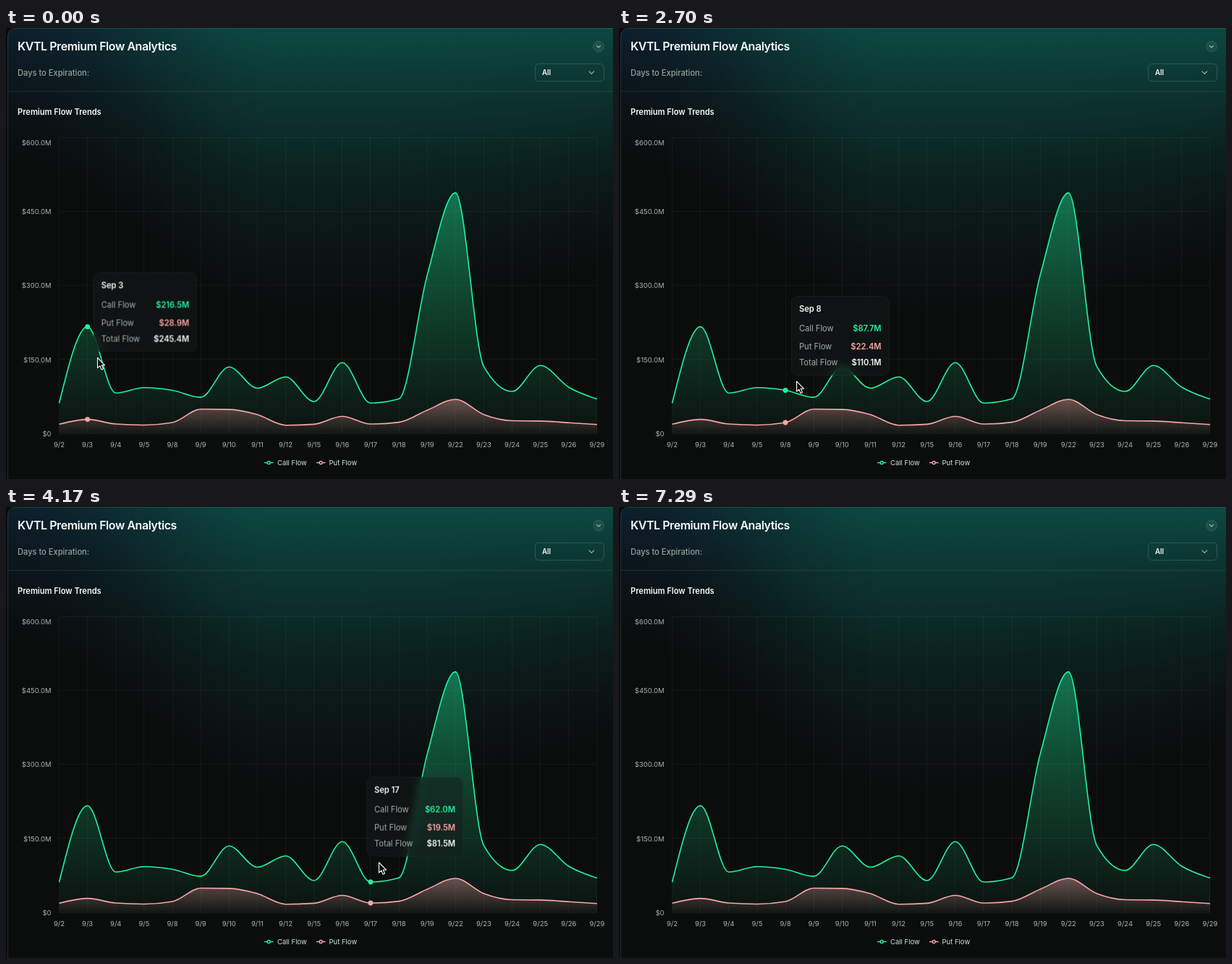
An HTML page with a canvas that plays this animation: 839x623 px, repeating every 7410 ms.

```html
<!DOCTYPE html>
<html lang="en">
<head>
<meta charset="utf-8">
<title>Premium Flow Analytics</title>
<style>
  html, body { margin: 0; width: 100%; height: 100%; overflow: hidden; background: #0a0c0c; }
  body { font-family: Inter, "Liberation Sans", sans-serif; }
  #stage { position: relative; width: 839px; height: 623px; overflow: hidden; }
  canvas, svg { position: absolute; left: 0; top: 0; display: block; }
  text { font-size: 9.5px; fill: #a9b3b0; }
  .title { font-size: 15.9px; font-weight: 600; letter-spacing: -.025em; fill: #f6faf9; }
  .label { font-size: 11.1px; font-weight: 500; fill: #93a19e; }
  .head { font-size: 11.1px; font-weight: 600; fill: #f6faf9; }
  .pick { font-size: 9.7px; font-weight: 600; fill: #f6faf9; }
  .legend { fill: #cfe3da; }
  .end { text-anchor: end; }
  .mid { text-anchor: middle; }
  .line { fill: none; stroke-width: 1.6; }
  .call { --ink: #1ff5a0; }
  .put { --ink: #fca5a5; }
  .line, .mark { stroke: var(--ink); }
  .mark { fill: #0c0f0f; stroke-width: 1.4; }
  .dot { fill: var(--ink); }
  .grid { stroke: #fff; stroke-opacity: .045; }
  .chevron { fill: none; stroke: #9fb0ad; stroke-width: 1.1; stroke-linecap: round; stroke-linejoin: round; }
  #tip {
    position: absolute; left: 0; top: 0; box-sizing: border-box; padding: 9px 10px;
    border: 1px solid rgba(255, 255, 255, .035); border-radius: 9px;
    background: rgba(24, 28, 27, .45); backdrop-filter: blur(6px);
    font-size: 11.1px; line-height: 16px; white-space: nowrap; color: #a6afad;
  }
  #tip div { display: flex; justify-content: space-between; gap: 19px; height: 16px; }
  #tip b { font-weight: 600; color: var(--ink, #f6faf9); }
  #tip .call { margin-top: 10.5px; }
  #tip .put { margin-top: 9px; }
  #tip .total { margin-top: 6.5px; }
</style>
</head>
<body>
<div id="stage">
  <canvas id="glow" width="839" height="623"></canvas>
  <svg width="839" height="623">
    <defs>
      <linearGradient id="callFill" x1="0" y1="0" x2="0" y2="1">
        <stop offset="0" stop-color="#1ff5a0" stop-opacity=".4"/>
        <stop offset="1" stop-color="#1ff5a0" stop-opacity=".02"/>
      </linearGradient>
      <linearGradient id="putFill" x1="0" y1="0" x2="0" y2="1">
        <stop offset="0" stop-color="#fca5a5" stop-opacity=".38"/>
        <stop offset="1" stop-color="#fca5a5" stop-opacity=".03"/>
      </linearGradient>
    </defs>
    <path d="M2.5 623V12Q2.5 .5 14 .5H839" fill="none" stroke="#5a8a88" stroke-opacity=".25"/>
    <path d="M3 87.5H839" stroke="#6fa5a0" stroke-opacity=".17"/>

    <text class="title" x="16" y="31">KVTL Premium Flow Analytics</text>
    <text class="label" x="16" y="66">Days to Expiration:</text>
    <text class="head" x="16" y="120">Premium Flow Trends</text>

    <circle cx="819" cy="25.5" r="7.5" fill="#fff" fill-opacity=".07" stroke="#fff" stroke-opacity=".1"/>
    <path class="chevron" d="M816.5 24.5l2.5 2.5 2.5-2.5"/>
    <rect x="731.5" y="49.5" width="95" height="24" rx="5" fill="none" stroke="#8fb5b0" stroke-opacity=".25"/>
    <text class="pick" x="741" y="64.5">All</text>
    <path class="chevron" d="M806 60l3.3 3.3 3.3-3.3"/>

    <g id="axes"></g>
    <path id="callArea" fill="url(#callFill)"/>
    <path id="callLine" class="line call"/>
    <path id="putArea" fill="url(#putFill)"/>
    <path id="putLine" class="line put"/>

    <g class="call">
      <path class="mark" d="M357 600.5h12.5"/><circle class="mark" cx="363.2" cy="600.5" r="2"/>
    </g>
    <text class="legend" x="375" y="603.5">Call Flow</text>
    <g class="put">
      <path class="mark" d="M429 600.5h12.5"/><circle class="mark" cx="435.2" cy="600.5" r="2"/>
    </g>
    <text class="legend" x="446.5" y="603.5">Put Flow</text>

    <g id="dots">
      <circle id="callDot" class="dot call" r="3.4"/>
      <circle id="putDot" class="dot put" r="3.4"/>
    </g>
  </svg>
  <div id="tip">
    <div><b id="day"></b></div>
    <div class="call">Call Flow<b id="callVal"></b></div>
    <div class="put">Put Flow<b id="putVal"></b></div>
    <div class="total">Total Flow<b id="totalVal"></b></div>
  </div>
  <svg width="839" height="623">
    <path id="pointer" d="M.5 0V14.2L3.8 11.2 6 16.4 8.5 15.3 6.3 10.3H10.6Z" fill="#0b0d0d" stroke="#fff" stroke-width="1.1" stroke-linejoin="round"/>
  </svg>
</div>
<script>
const $ = id => document.getElementById(id);
const LOOP = 7410, LEFT = 73.5, GAP = 39.13, BASE = 560.3, TOP = 151;
// Weekdays of the month
const days = Array.from({ length: 28 }, (_, i) => i + 2).filter(d => d % 7 && d % 7 !== 6);
const call = [61.6, 216.5, 82.1, 93.2, 87.7, 73.5, 135, 92, 114.8, 65, 143.8, 62, 70.4, 321, 487.8, 136, 85.5, 138, 94, 70];
const put = [19, 28.9, 19.4, 17.4, 22.4, 49.5, 49, 38.5, 17, 19, 35, 19.5, 23, 47.5, 69.4, 38.5, 26, 25.5, 22, 18.5];
const px = i => LEFT + GAP * i;
const py = v => BASE - v * .682;
const clamp = u => Math.min(Math.max(u, 0), 1);
const smooth = u => u * u * (3 - 2 * u);

// Backdrop: a teal fade, bluer and shallower on the left.
function depth(x) {
  return x < 400
    ? 345 - 180 * Math.sin(Math.PI / 2 * (1 - x / 400)) ** 2
    : 345 - 70 * ((x - 400) / 439) ** 2;
}

function paintGlow() {
  const c = $('glow').getContext('2d'), stops = 10;
  c.fillStyle = '#0a0c0c';
  c.fillRect(0, 0, 839, 623);
  c.beginPath();
  c.roundRect(2, 0, 860, 660, 12);
  c.clip();
  for (let x = 2; x < 839; x++) {
    const mix = smooth(clamp(x / 380));
    const g = c.createLinearGradient(0, 0, 0, depth(x) * 1.15);
    for (let i = 0; i <= stops; i++) {
      const k = (1 - i / stops) ** 1.4;
      g.addColorStop(i / stops, `rgb(${11 + k}, ${13 + k * (19 + 40 * mix)}, ${13 + k * (32 + 21 * mix)})`);
    }
    c.fillStyle = g;
    c.fillRect(x, 0, 1, 623);
  }
}

// Monotone cubic through evenly spaced points
function curve(vals) {
  const y = vals.map(py), n = y.length - 1, s = [], m = [];
  for (let i = 0; i < n; i++) s.push((y[i + 1] - y[i]) / GAP);
  for (let i = 1; i < n; i++) {
    const a = s[i - 1], b = s[i];
    m[i] = (Math.sign(a) + Math.sign(b)) * Math.min(Math.abs(a), Math.abs(b), Math.abs(a + b) / 4);
  }
  m[0] = (3 * s[0] - m[1]) / 2;
  m[n] = (3 * s[n - 1] - m[n - 1]) / 2;
  const h = GAP / 3;
  let d = `M${px(0)} ${y[0]}`;
  for (let i = 0; i < n; i++)
    d += `C${px(i) + h} ${y[i] + m[i] * h} ${px(i + 1) - h} ${y[i + 1] - m[i + 1] * h} ${px(i + 1)} ${y[i + 1]}`;
  return d;
}

function drawSeries(name, vals) {
  const d = curve(vals);
  $(name + 'Line').setAttribute('d', d);
  $(name + 'Area').setAttribute('d', `${d}V${BASE}H${LEFT}Z`);
}

function drawAxes() {
  let out = '';
  days.forEach((d, i) => {
    const x = Math.floor(px(i)) + .5;
    out += `<path class="grid" d="M${x} ${TOP}V${BASE}"/><text class="mid" x="${px(i)}" y="579">9/${d}</text>`;
  });
  for (let v = 0; v <= 600; v += 150) {
    const y = Math.floor(py(v)) + .5, label = v ? `$${v}.0M` : '$0';
    out += `<path class="grid" d="M${LEFT} ${y}H${px(19)}"/><text class="end" x="62.5" y="${Math.max(py(v) + 3.6, 161.8)}">${label}</text>`;
  }
  $('axes').innerHTML = out;
}

// Pointer legs: [from, to, x, y]
const home = [126, 455.5];
const legs = [
  [0, 600, 165, 477],
  [1500, 2100, 243.5, 488],
  [2640, 4010, 515, 491],
  [4440, 4800, 612.5, 464],
  [6690, 7290, 720, 640]
];
function pointerAt(t) {
  let [x, y] = home;
  for (const [from, to, nx, ny] of legs) {
    const u = smooth(clamp((t - from) / (to - from)));
    x += (nx - x) * u;
    y += (ny - y) * u;
  }
  return [x, y];
}
const nearest = x => Math.round((x - LEFT) / GAP);

// The tooltip trails its anchor: a mean over the recent past.
function tipAt(t) {
  const span = 650, n = 65;
  let sx = 0, sy = 0;
  for (let k = 0; k < n; k++) {
    const [x, y] = pointerAt(t - span * k / n);
    sx += px(nearest(x)) + 8;
    sy += y - 118;
  }
  return [sx / n, sy / n];
}

// The picture only moves in steps inside these spans.
const bursts = [[150, 900], [1650, 2400], [2700, 3720], [3870, 4170], [4610, 5350], [6840, 7290]];
function stepTime(t) {
  let q = 0;
  for (const [from, to] of bursts) {
    const gap = (to - from) / Math.round((to - from) / 147);
    if (t >= from) q = Math.min(to, from + gap * Math.floor((t - from + 8) / gap));
  }
  return q;
}

const money = v => `$${v.toFixed(1)}M`;
const place = (id, x, y) => $(id).setAttribute('transform', `translate(${x} ${y})`);

function render(t) {
  const q = stepTime(t), [x, y] = pointerAt(q), [tx, ty] = tipAt(q), i = nearest(x);
  place('pointer', x, y);
  place('callDot', px(i), py(call[i]));
  place('putDot', px(i), py(put[i]));
  $('dots').style.visibility = $('tip').style.visibility = y < BASE ? 'visible' : 'hidden';
  $('tip').style.transform = `translate(${tx}px, ${ty}px)`;
  $('day').textContent = 'Sep ' + days[i];
  $('callVal').textContent = money(call[i]);
  $('putVal').textContent = money(put[i]);
  $('totalVal').textContent = money(call[i] + put[i]);
}

paintGlow();
drawAxes();
drawSeries('call', call);
drawSeries('put', put);
const begin = performance.now();
function frame() {
  render((performance.now() - begin) % LOOP);
  requestAnimationFrame(frame);
}
frame();
</script>
</body>
</html>
```
